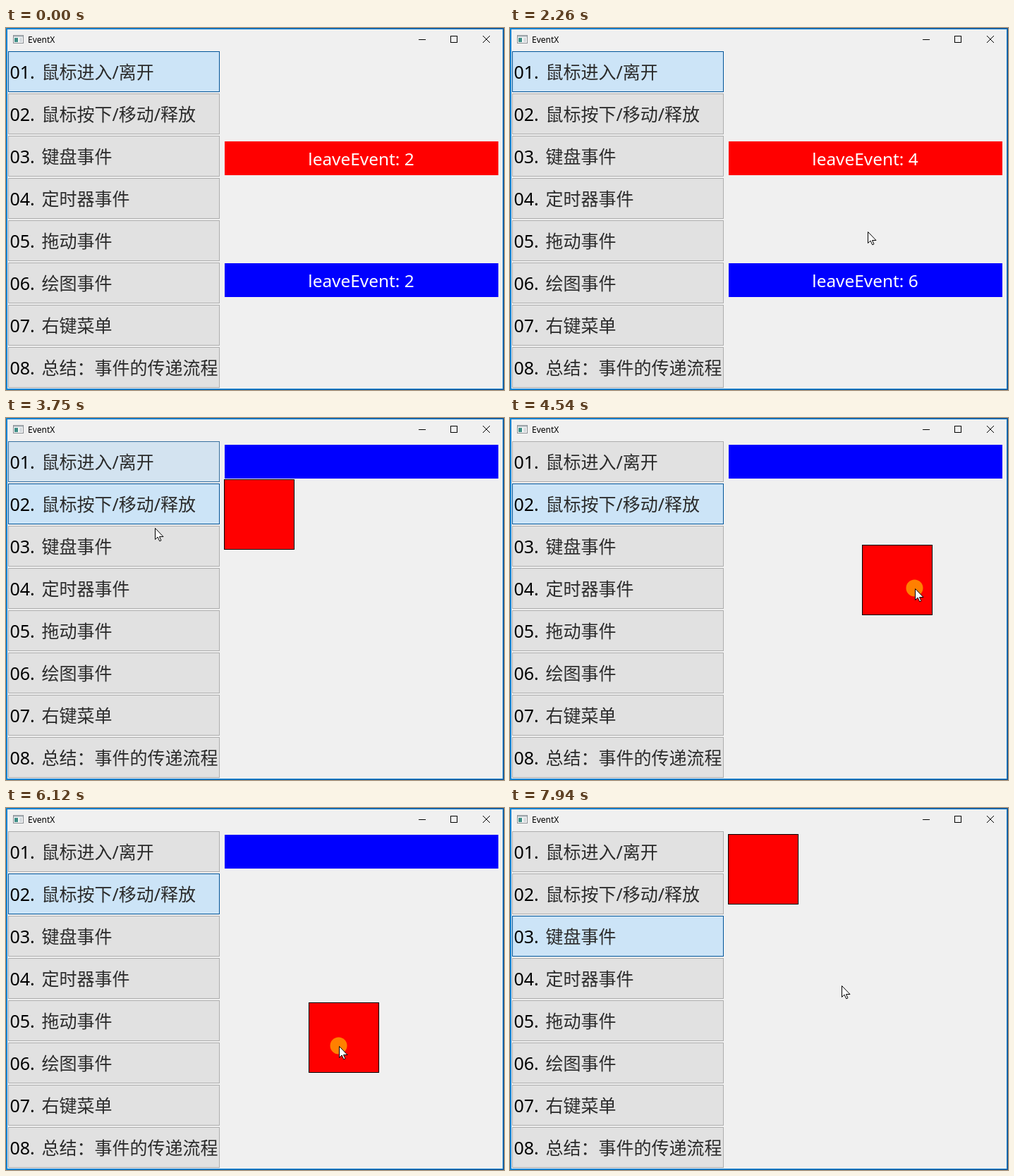
An HTML page with a canvas that plays this animation: 706x514 px, repeating every 8 s.

```html
<!DOCTYPE html>
<html lang="zh-CN">
<head>
<meta charset="utf-8">
<title>EventX</title>
<style>
  html, body { margin: 0; width: 100%; height: 100%; overflow: hidden; }
  canvas { display: block; }
</style>
</head>
<body>
<canvas id="stage" width="706" height="514"></canvas>
<script>
const ctx = document.getElementById('stage').getContext('2d');
const LOOP = 8000, FIRST = 220, STEP = 113.5, FADE = 500;
const LATIN = "'Noto Sans', 'Open Sans', sans-serif";
const HAN = "'Noto Sans', 'Noto Sans CJK SC', 'Noto Sans CJK JP', sans-serif";
const RED = '#ff0000', BLUE = '#0000ff', FACE = '#f0f0f0';
const BAR = { x: 310, w: 388, h: 48 };
const labels = ['鼠标进入/离开', '鼠标按下/移动/释放', '键盘事件', '定时器事件',
  '拖动事件', '绘图事件', '右键菜单', '总结：事件的传递流程'];

// Where the cursor arrives and when; "click" and "drag" hold the button on the way there.
const buttonTwo = { x: 211, y: 130 }, buttonThree = { x: 211, y: 183 };
const stops = [
  { t: 2260, x: 507, y: 289 },
  { t: 3400, ...buttonTwo },
  { t: 3580, ...buttonTwo, hold: 'click' },
  { t: 3740, x: 211, y: 156 },
  { t: 3980, x: 384, y: 149 },
  { t: 4440, x: 582, y: 240, hold: 'drag' },
  { t: 4950, x: 486, y: 262, hold: 'drag' },
  { t: 5650, x: 454, y: 262 },
  { t: 6120, x: 472, y: 338, hold: 'drag' },
  { t: 6370, x: 370, y: 250, hold: 'drag' },
  { t: 6580, ...buttonThree },
  { t: 6690, ...buttonThree, hold: 'click' },
  { t: 7400, ...buttonThree },
  { t: 7940, x: 470, y: 252 }
];
const pageStarts = [0, ...stops.filter(s => s.hold === 'click').map(s => s.t)];

const mix = (a, b, k) => a + (b - a) * k;
const mixColor = (a, b, k) => `rgb(${a.map((v, i) => Math.round(mix(v, b[i], k)))})`;
const clamp01 = k => Math.min(1, Math.max(0, k));
const smooth = k => k * k * (3 - 2 * k);

const stepTime = t => t < FIRST ? 0 : FIRST + Math.floor((t - FIRST) / STEP + .2) * STEP;

// Swings down, up and down again across both labels.
function wander(t) {
  const p = clamp01((t - FIRST) / (stops[0].t - FIRST));
  return {
    x: mix(495, stops[0].x, p),
    y: mix(235, stops[0].y, p) + 150 * Math.sin(3 * Math.PI * p)
  };
}

function cursorAt(t) {
  const i = stops.findIndex(s => s.t > t);
  if (i === 0) return wander(t);
  if (i < 0) return stops.at(-1);
  const a = stops[i - 1], b = stops[i];
  const k = smooth((t - a.t) / (b.t - a.t));
  return { x: mix(a.x, b.x, k), y: mix(a.y, b.y, k), hold: b.hold };
}

// The square follows the cursor along every dragged leg.
function squareAt(t) {
  const spot = { x: 309, y: 87 };
  stops.forEach((stop, i) => {
    const from = stops[i - 1];
    if (stop.hold !== 'drag' || t < from.t) return;
    const to = t < stop.t ? cursorAt(t) : stop;
    spot.x += to.x - from.x;
    spot.y += to.y - from.y;
  });
  return spot;
}

function labelText(top, t) {
  let count = 2, inside = false;
  for (let time = FIRST; time <= t; time += 10) {
    const { x, y } = cursorAt(time);
    const over = x >= BAR.x && y >= top && y < top + BAR.h;
    if (over && !inside) count++;
    inside = over;
  }
  return `${inside ? 'enter' : 'leave'}Event: ${count}`;
}

function rect(x, y, w, h, fill, border) {
  ctx.fillStyle = fill;
  ctx.fillRect(x, y, w, h);
  if (!border) return;
  ctx.strokeStyle = border;
  ctx.lineWidth = 1;
  ctx.strokeRect(x + .5, y + .5, w - 1, h - 1);
}

function text(str, x, y, font, color = '#000', align = 'left') {
  ctx.font = font;
  ctx.fillStyle = color;
  ctx.textAlign = align;
  ctx.fillText(str, x, y);
}

function drawWindow() {
  const desktop = ctx.createLinearGradient(0, 0, 706, 0);
  desktop.addColorStop(0, '#0a84d0');
  desktop.addColorStop(1, '#1b4f86');
  rect(0, 0, 706, 514, desktop);
  rect(1, 1, 704, 512, FACE, '#1883d7');

  rect(10, 10, 15, 12, '#fafafa', '#8a8f94');
  rect(11, 11, 13, 2, '#b9c2c8');
  rect(12, 14, 5, 6, '#3f8f86');
  rect(19, 14, 4, 6, '#d5dade');
  text('EventX', 31, 21, `12px ${LATIN}`);

  ctx.strokeStyle = '#000';
  ctx.lineWidth = 1;
  ctx.strokeRect(630.5, 11.5, 9, 9);
  ctx.beginPath();
  ctx.moveTo(585, 16.5); ctx.lineTo(595, 16.5);
  ctx.moveTo(676, 11); ctx.lineTo(686, 21);
  ctx.moveTo(686, 11); ctx.lineTo(676, 21);
  ctx.stroke();
}

function drawButtons(t, page) {
  labels.forEach((label, i) => {
    let fade = 1;
    if (i === page) fade = 0;
    else if (i === page - 1) fade = clamp01((t - pageStarts[page]) / FADE);
    const y = 33 + i * 60;
    rect(3, y, 300, 58,
      mixColor([204, 228, 247], [225, 225, 225], fade),
      mixColor([0, 84, 153], [173, 173, 173], fade));
    text(`0${i + 1}.`, 5.5, y + 39, `25px ${LATIN}`);
    text(label, 50.5, y + 39, `25px ${HAN}`, '#2b2b2b');
  });
}

function drawLabel(top, color, t) {
  rect(BAR.x, top, BAR.w, BAR.h, color);
  text(labelText(top, t), 503.5, top + 34, `24.4px ${LATIN}`, '#fff', 'center');
}

function drawPage(t, page) {
  if (page === 0) {
    drawLabel(161, RED, t);
    drawLabel(334, BLUE, t);
    return;
  }
  if (page === 1) rect(BAR.x, 38, BAR.w, BAR.h, BLUE);
  const { x, y } = page === 1 ? squareAt(t) : { x: 309, y: 37 };
  rect(Math.round(x), Math.round(y), 100, 100, RED, '#000');
}

function drawCursor({ x, y, hold }) {
  ctx.save();
  ctx.translate(Math.round(x) + .5, Math.round(y) + .5);
  if (hold) {
    ctx.fillStyle = 'rgba(255, 255, 0, .5)';
    ctx.beginPath();
    ctx.arc(-1, -1, 12, 0, Math.PI * 2);
    ctx.fill();
  }
  const arrow = new Path2D('M0 0V16L3.5 12.5L6.3 18.3L8.5 17.3L6 12H11.5Z');
  ctx.fillStyle = '#fff';
  ctx.strokeStyle = '#000';
  ctx.lineWidth = 1;
  ctx.fill(arrow);
  ctx.stroke(arrow);
  ctx.restore();
}

function draw(now) {
  const t = stepTime(now % LOOP);
  const page = pageStarts.findLastIndex(start => start <= t);
  drawWindow();
  drawButtons(t, page);
  drawPage(t, page);
  if (t >= FIRST) drawCursor(cursorAt(t));
  requestAnimationFrame(draw);
}
requestAnimationFrame(draw);
</script>
</body>
</html>
```
